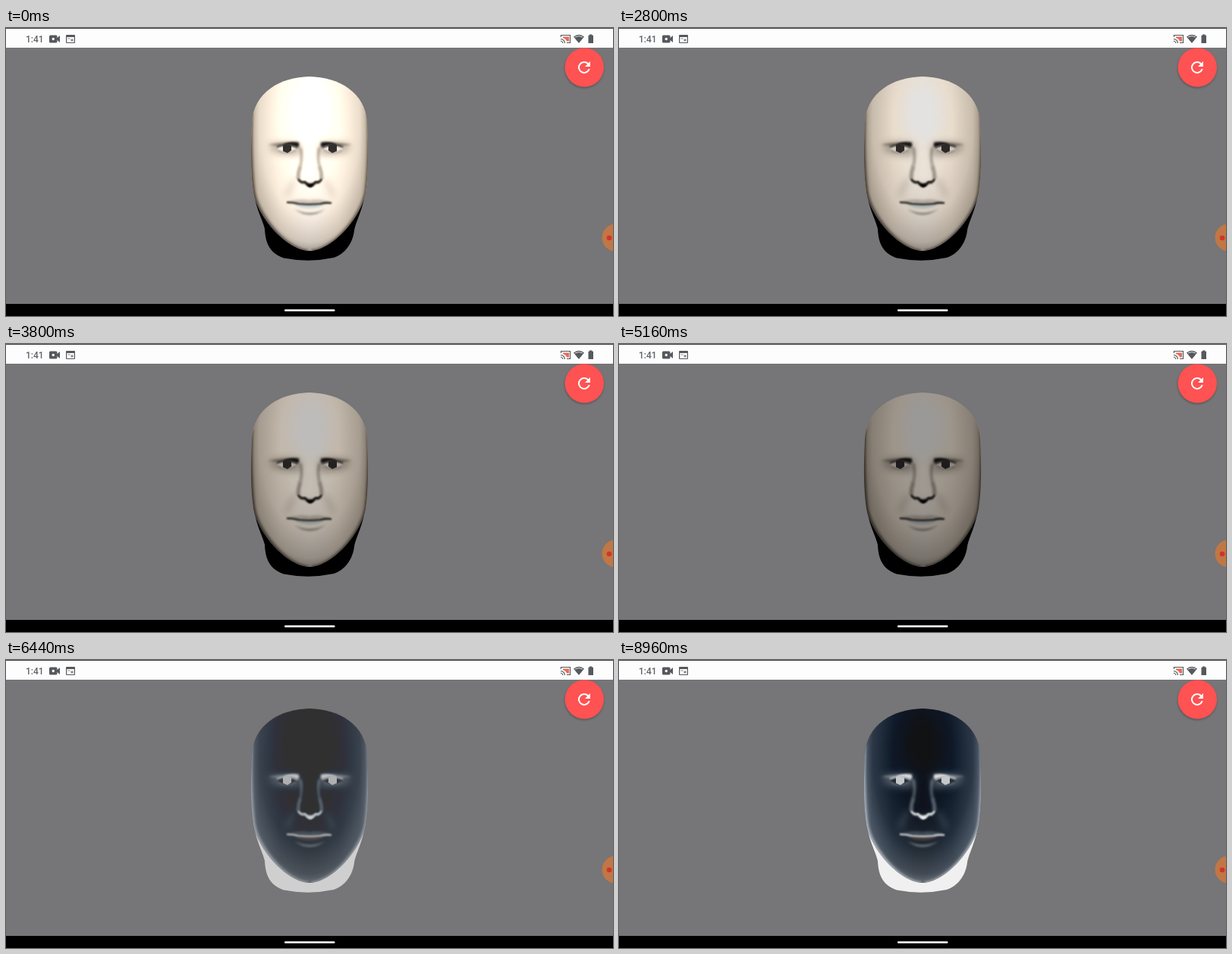
An HTML page that plays this animation: 800x380 px, repeating every 9.04 s.

```html
<!DOCTYPE html>
<html lang="en">
<head>
<meta charset="utf-8">
<title>Head shading</title>
<style>
  html, body { margin: 0; width: 100%; height: 100%; overflow: hidden; background: #767577; }
  svg { position: absolute; left: 0; top: 0; width: 800px; height: 380px; }
  .clock { font: 500 12px Roboto, sans-serif; fill: #5f6368; }
  .b1 { filter: blur(.8px); }
  .b2 { filter: blur(1.8px); }
  .b4 { filter: blur(4px); }
  .b9 { filter: blur(8px); }
  #head { animation: shade 9040ms linear infinite; }

  /* The light fades, the head flattens to grey, then turns negative. */
  @keyframes shade {
    0%, 4.87% { filter: brightness(1.13) invert(0); }
    30.97% { filter: brightness(.96) invert(0); }
    42.04% { filter: brightness(.8) invert(0); }
    55.75%, 58.85% { filter: brightness(.65) invert(0); }
    65.93%, 66.37% { filter: brightness(.25) invert(.455); }
    71.24% { filter: brightness(1.16) invert(.81); }
    80.97% { filter: brightness(1.09) invert(.88); }
    99.12%, 100% { filter: brightness(1.07) invert(.94); }
  }
</style>
</head>
<body>
<svg id="head" viewBox="0 0 800 380">
  <defs>
    <path id="face" d="M400 64C438 65 474 84 476 126C477.500 160 478 190 474 217C469 247 432 293 400 294C368 293 331 247 326 217C322 190 322.500 160 324 126C326 84 362 65 400 64Z"/>
    <clipPath id="inside"><use href="#face"/></clipPath>
    <linearGradient id="skin">
      <stop offset="0" stop-color="#c4b6a4"/>
      <stop offset=".07" stop-color="#e4d7c6"/>
      <stop offset=".25" stop-color="#f3e6d6"/>
      <stop offset=".5" stop-color="#f2eae0"/>
      <stop offset=".75" stop-color="#f3e6d6"/>
      <stop offset=".93" stop-color="#e4d7c6"/>
      <stop offset="1" stop-color="#c4b6a4"/>
    </linearGradient>
    <radialGradient id="falloff" gradientUnits="userSpaceOnUse" cx="0" cy="0" r="1" gradientTransform="translate(400.500 125) scale(95 175)">
      <stop offset=".4" stop-color="#2a221a" stop-opacity="0"/>
      <stop offset=".7" stop-color="#2a221a" stop-opacity=".11"/>
      <stop offset=".9" stop-color="#2a221a" stop-opacity=".29"/>
      <stop offset="1.000" stop-color="#1a1510" stop-opacity=".55"/>
    </radialGradient>
    <g id="side">
      <!-- jaw edge -->
      <path class="b2" d="M323 112Q321 175 326 217C331 247 368 293 398 295" fill="none" stroke="#1d1813" stroke-width="5" opacity=".6"/>
      <!-- brow and socket -->
      <path class="b4" d="M347 154Q363 146 388 152L389 168Q366 172 350 163Z" fill="#5d5348" opacity=".4"/>
      <path class="b2" d="M345 154Q362 151 386 150L387 158Q376 154 362 156Z" fill="#15110d" opacity=".45"/>
      <path class="b1" d="M366 153Q376 149 385 151.500Q387 155 384 157Q375 153 366 154.500Z" fill="#080605" opacity=".85"/>
      <!-- eye -->
      <path class="b1" d="M357 158Q369 151 384 158Q379 164.500 369 164.500Q361 163.500 357 158Z" fill="#d8d2ca"/>
      <path class="b1" d="M357 157Q370 151 384 158" fill="none" stroke="#0b0908" stroke-width="1.600"/>
      <path class="b1" d="M359 162Q370 168 382 161" fill="none" stroke="#776b5e" stroke-width="1"/>
      <path d="M365 154L370 153L376 155L376.200 161.500L371 165L365 162.500Z" fill="#2d2a29"/>
      <!-- nose flank -->
      <path class="b2" d="M388 158Q391 170 388 182" fill="none" stroke="#5a4f43" stroke-width="4" opacity=".42"/>
      <path class="b2" d="M388 182Q385 190 385 199" fill="none" stroke="#5a4f43" stroke-width="5" opacity=".5"/>
      <path class="b4" d="M381 200Q374 210 370 222" fill="none" stroke="#756859" stroke-width="5" opacity=".3"/>
    </g>
  </defs>

  <path d="M326 214C330 241 338 252 341 265C342 285 348 297 366 303.500Q399 310 432 303C447 298 457 284 459 267C462 253 470 241 474 214L400 170Z"/>
  <use href="#face" fill="url(#skin)"/>
  <g clip-path="url(#inside)">
    <ellipse class="b9" cx="401" cy="112" rx="25" ry="38" fill="#ecebea" opacity=".9"/>
    <use href="#face" fill="url(#falloff)"/>
    <use href="#side"/>
    <use href="#side" transform="translate(801) scale(-1 1)"/>
    <!-- nose -->
    <path class="b2" d="M397 160Q400 178 396 194Q401 201 406 194Q402 178 404 160Z" fill="#f4ebe0"/>
    <path class="b2" d="M385 198Q388 207 394 205Q401 214 408 205Q414 207 416 198L413 202L401 205L389 202Z" fill="#17110c" opacity=".75"/>
    <path class="b1" d="M385 199Q388 205 394 203Q398 208.500 401 208.500Q404 208.500 408 203Q413 205 416 199" fill="none" stroke="#050403" stroke-width="2.200"/>
    <path class="b1" d="M397 206Q401 214 405 206Z"/>
    <!-- mouth -->
    <path class="b2" d="M371 229Q389 224 400 227Q412 224 428 230L400 233Z" fill="#6e6254" opacity=".35"/>
    <path class="b1" d="M378 232Q400 234 422 232Q412 238.500 400 238.500Q388 238.500 378 232Z" fill="#b9c1bf"/>
    <path class="b1" d="M370 230Q379 230 386 232Q400 233.500 414 232Q422 230 429 231" fill="none" stroke="#0b0907" stroke-width="2.200"/>
    <path class="b2" d="M380 239Q400 254 421 239Q411 244 400 244Q390 244 380 239Z" fill="#4c4238" opacity=".65"/>
  </g>
</svg>

<svg viewBox="0 0 800 380">
  <rect width="800" height="26" fill="#fdfdfd"/>
  <rect width="800" height="1" fill="#444"/>
  <text class="clock" x="26" y="19">1:41</text>
  <g fill="#55585c">
    <path d="M58.500 9.500H66Q67.500 9.500 67.500 11V13L71 10V19L67.500 16V18Q67.500 19.500 66 19.500H58.500Q57 19.500 57 18V11Q57 9.500 58.500 9.500Z"/>
    <circle cx="62.300" cy="14.500" r="1.700" fill="#fff"/>
    <path fill-rule="evenodd" d="M80 9H90Q91 9 91 10V19Q91 20 90 20H80Q79 20 79 19V10Q79 9 80 9ZM80.200 12V18.900H89.800V12Z"/>
    <path d="M81.500 13.500H84.500V14.500H81.500ZM85.500 14.500H88.500V17.500H85.500Z" opacity=".7"/>
    <path d="M748 11.500Q755 6 762 11.500L755 20Z"/>
    <path d="M750 12Q755 9 760 12" fill="none" stroke="#fff" stroke-width=".8"/>
    <path d="M769 8.500H772.500V9.800H774V20H767.500V9.800H769Z"/>
  </g>
  <path d="M734 11.500H742V17.500H739Q738 14 734 13Z" fill="#e86b5e"/>
  <path d="M731.500 12V9.500H743.500V19.500H739M731 14.500Q736 15 736.500 20M731 17Q733.500 17.500 734 20" fill="none" stroke="#55585c" stroke-width="1.200"/>

  <circle class="b2" cx="762" cy="53.500" r="25.500" opacity=".3"/>
  <circle cx="762.300" cy="52" r="25.700" fill="#ff5252"/>
  <path transform="translate(750 40)" fill="#fff" d="M17.650 6.350A8 8 0 1 0 19.730 14H17.650A6 6 0 1 1 16.220 7.780L13 11H20V4Z"/>

  <circle cx="803.500" cy="276.500" r="18" fill="#c07745"/>
  <circle cx="795" cy="277" r="3.300" fill="#d3332d"/>

  <rect y="364" width="800" height="16"/>
  <rect x="367" y="371.300" width="66.500" height="2.400" rx="1.200" fill="#fff"/>
</svg>
</body>
</html>
```
